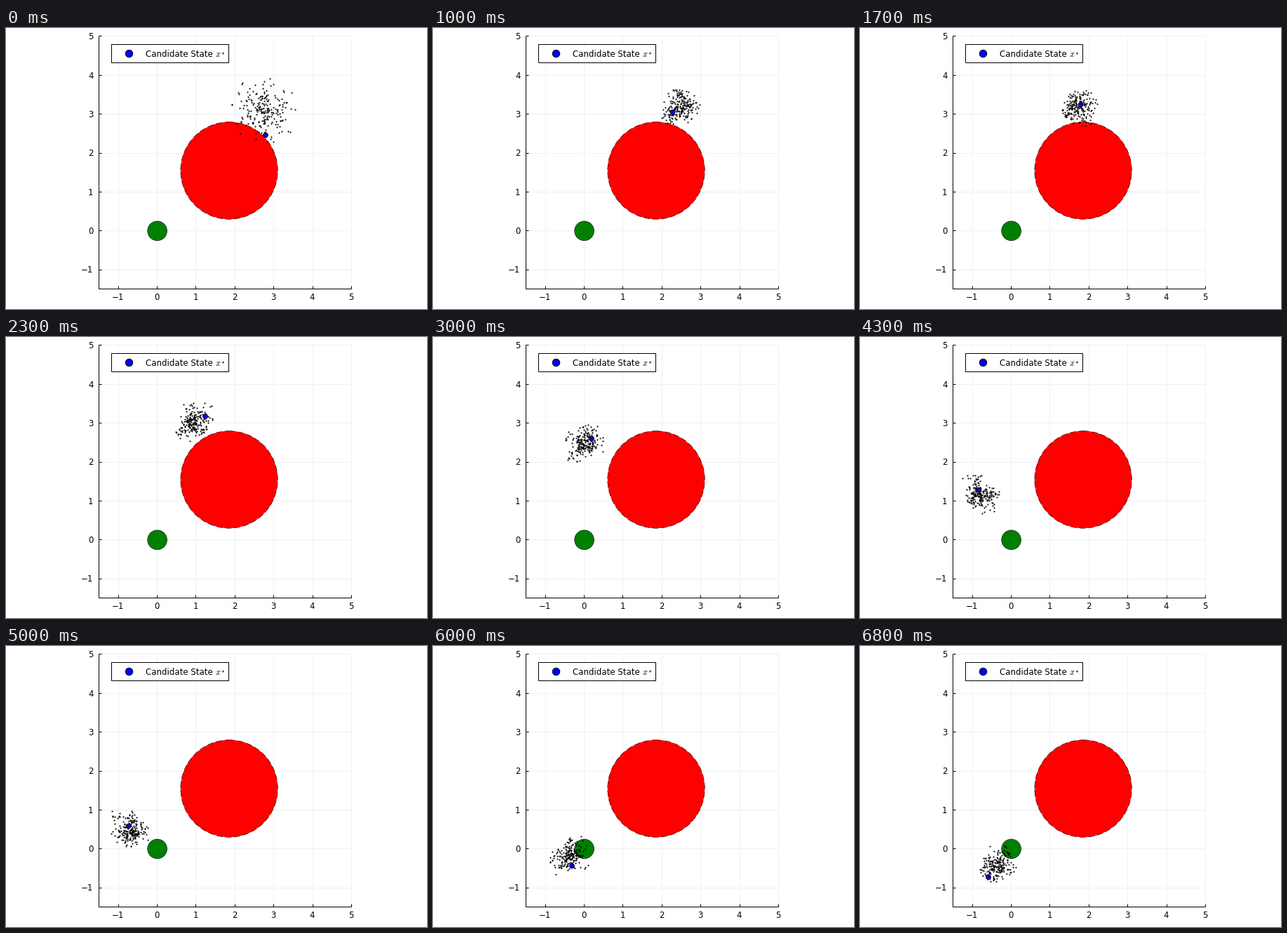
Write a matplotlib script that moves like this. It is 600x400 px and loops after 6.9 s.

```python
import numpy as np
import matplotlib.pyplot as plt
from matplotlib.animation import FuncAnimation
from matplotlib.patches import Circle, Rectangle

W, H, DPI = 600, 400, 100
FRAMES, INTERVAL = 69, 100
COUNT = 210
PX = 72 / DPI                      # one pixel in points
LEFT, RIGHT, TOP, BOTTOM = 132.5, 492.5, 11.5, 371.5
UNIT = 55.37

plt.rcParams.update({"font.family": "DejaVu Sans", "mathtext.fontset": "cm"})


def to_x(v):
    return 215.6 + UNIT * v


def to_y(v):
    return 288.8 - UNIT * v


fig = plt.figure(figsize=(W / DPI, H / DPI), dpi=DPI, facecolor="white")
ax = fig.add_axes([0, 0, 1, 1])
ax.set_xlim(0, W)
ax.set_ylim(H, 0)
ax.axis("off")


def line(xs, ys, color="black", z=1):
    ax.plot(xs, ys, color=color, lw=PX, zorder=z, solid_capstyle="butt", snap=False)


def label(x, y, text, size=11.7, ha="center"):
    ax.text(x, y, text, fontsize=size * PX, ha=ha, va="baseline", zorder=9)


def disc(x, y, r, color, z, lw=1.0, ls="-"):
    return ax.add_patch(Circle((x, y), r, fc=color, ec="black", lw=lw * PX,
                               ls=ls, zorder=z))


# Grid, ticks and axis lines, centred on whole pixels
for v in range(-1, 6):
    x, y = np.floor([to_x(v), to_y(v)]) + 0.5
    name = str(v).replace("-", "\u2212")
    line([x, x], [TOP, BOTTOM], "#f0f0f0", 0)
    line([LEFT, RIGHT], [y, y], "#f0f0f0", 0)
    line([x, x], [BOTTOM, BOTTOM - 4])
    line([LEFT, LEFT + 4], [y, y])
    label(to_x(v) - 0.5, 387.4, name)
    label(124.6, to_y(v) + 4.3, name, ha="right")
line([LEFT, LEFT], [TOP, BOTTOM + 0.5])
line([LEFT, RIGHT], [BOTTOM, BOTTOM])

# Obstacle and goal
disc(to_x(1.85), to_y(1.55), 1.25 * UNIT, "red", 2, 0.6, (0, (14, 7)))
disc(to_x(0), to_y(0), 0.25 * UNIT, "green", 2, 0.6)

# Legend
ax.add_patch(Rectangle((150.5, 23.5), 167, 26, fc="white", ec="black", lw=PX,
                       zorder=6, snap=False))
disc(175.5, 36.5, 5.2, "blue", 8)
label(199, 41, "Candidate State", ha="left")
label(298, 41, "$x$", 12.2, "left")
label(306.3, 37.5, r"$\star$", 7, "left")

# Key points of the two paths, reached at the same times
KEY_TIMES = np.array([0, 10, 23, 36, 50, 60, 68])
CENTRE = np.array([(367, 117), (352, 112), (267, 121), (181, 183),
                   (177, 262), (194, 298), (195, 312)])
CANDIDATE = np.array([(370, 152.5), (341.5, 120), (284, 113), (183, 180),
                      (174.5, 256.5), (198, 313), (183, 329)])


def glide(points, k):
    """Smooth cubic path through the key points."""
    slope = np.gradient(points, KEY_TIMES, axis=0)
    i = min(np.searchsorted(KEY_TIMES, k, side="right"), len(KEY_TIMES) - 1) - 1
    span = KEY_TIMES[i + 1] - KEY_TIMES[i]
    s = (k - KEY_TIMES[i]) / span
    ease = s * s * (3 - 2 * s)
    return (points[i] * (1 - ease) + points[i + 1] * ease
            + span * s * (1 - s) * ((1 - s) * slope[i] - s * slope[i + 1]))


def make_cloud():
    """Resampled random walk, kept at zero mean and unit spread."""
    rng = np.random.default_rng(7)
    pts = rng.normal(size=(COUNT, 2))
    steps = []
    for _ in range(FRAMES):
        pts = (pts - pts.mean(0)) / pts.std(0)
        pts = np.clip(pts, -2.5, 2.5)
        steps.append(pts)
        parents = rng.integers(0, COUNT, COUNT)
        pts = 0.95 * pts[parents] + rng.normal(0, 0.3, (COUNT, 2))
    return steps


steps = make_cloud()
cloud, = ax.plot([], [], "o", color="black", ms=2.1 * PX, mew=0, zorder=7)
candidate = disc(0, 0, 3.3, "blue", 8)


def draw(k):
    spread = 10.7 + 7.3 * np.exp(-k / 4)
    cloud.set_data(*(glide(CENTRE, k) + spread * steps[k]).T)
    candidate.center = glide(CANDIDATE, k)
    return cloud, candidate


anim = FuncAnimation(fig, draw, frames=FRAMES, interval=INTERVAL,
                     repeat=True, repeat_delay=0, blit=False)
plt.show()
```
